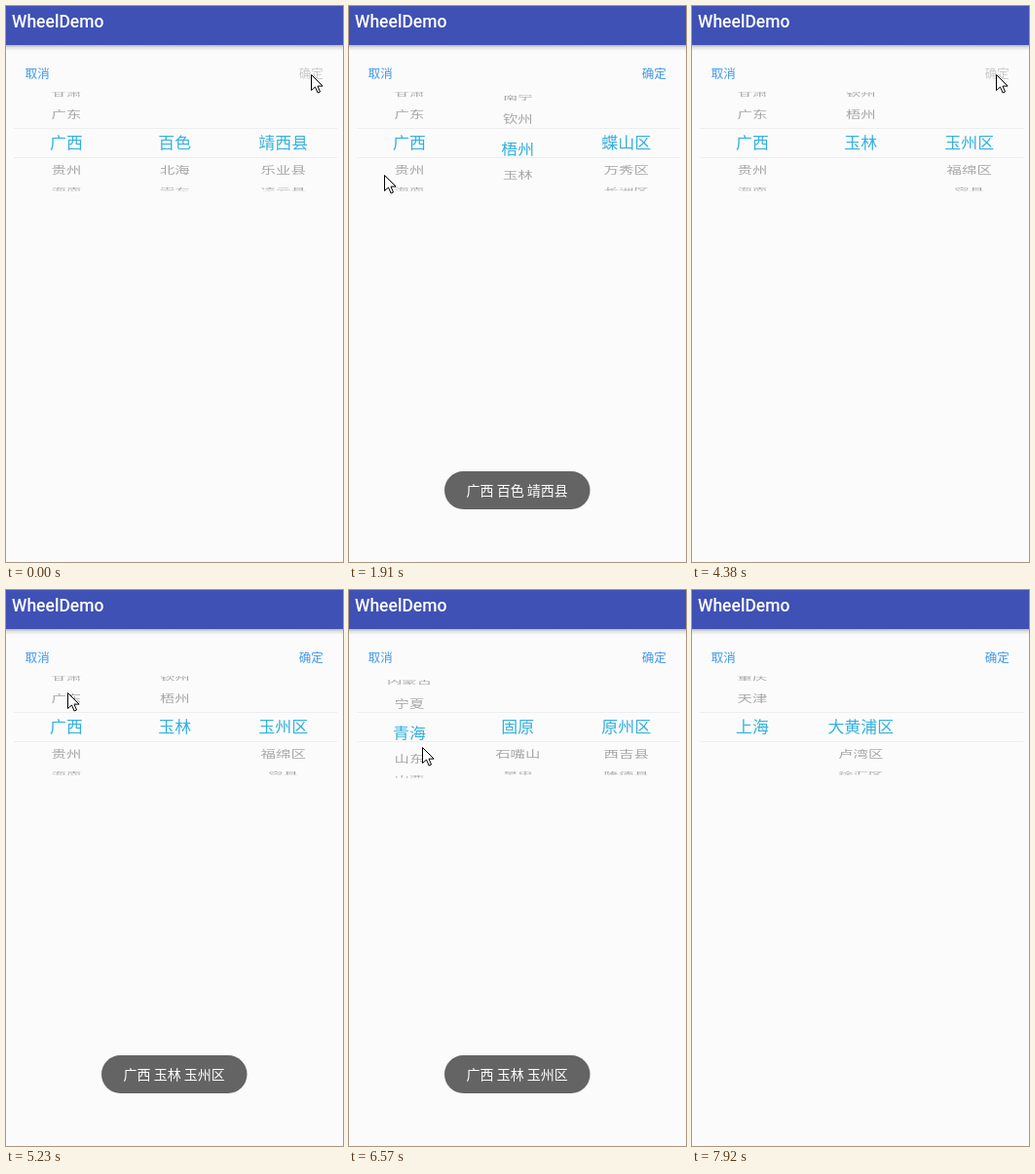
Write an HTML page with a canvas that moves like this. It is 346 px wide and 570 px high and loops after 8 s.

```html
<!DOCTYPE html>
<html lang="zh">
<head>
<meta charset="utf-8">
<style>
html, body { margin: 0; width: 100%; height: 100%; overflow: hidden; background: #fbfbfb; }
canvas { display: block; width: 346px; height: 570px; }
</style>
</head>
<body>
<canvas id="stage"></canvas>
<script>
const W = 346, H = 570, LOOP = 8000;
const CJK = '"Noto Sans CJK SC", "Noto Sans CJK", "Noto Sans CJK JP", sans-serif';
const canvas = document.getElementById('stage');
const ratio = window.devicePixelRatio || 1;
canvas.width = W * ratio;
canvas.height = H * ratio;
const ctx = canvas.getContext('2d');

const words = s => s.split(' ');
const provinces = words('安徽 福建 甘肃 广东 广西 贵州 海南 河北 河南 黑龙江 湖北 湖南 江苏 江西 吉林 辽宁 内蒙古 宁夏 青海 山东 山西 陕西 四川 西藏 新疆 云南 浙江 北京 重庆 天津 上海');
const guangxi = words('百色 北海 崇左 防城港 贵港 桂林 河池 贺州 来宾 柳州 南宁 钦州 梧州 玉林');
const ningxia = words('固原 石嘴山 吴忠 银川 中卫');
const shanghai = words('大黄浦区 卢湾区 徐汇区 长宁区');

function cityList(t) {
  return t < 6300 ? guangxi : t < 7450 ? ningxia : shanghai;
}

function districtList(t) {
  if (t < 1700) return words('靖西县 乐业县 凌云县');
  if (t < 2650) return words('蝶山区 万秀区 长洲区');
  if (t < 6300) return words('玉州区 福绵区 容县');
  return t < 7450 ? words('原州区 西吉县 隆德县') : [];
}

// Screen refreshes: start, end, number of evenly spaced updates
const bursts = [
  [150, 810, 6], [1090, 2060, 8], [2210, 3150, 8], [3270, 3970, 6],
  [4380, 5380, 8], [5530, 6570, 9], [6690, 7620, 8], [7770, 7920, 2]
];

// Pointer keys: time, x, y
const pointer = [
  [282, 313, 70], [810, 167, 172], [1090, 167, 165], [1370, 174, 98],
  [1650, 170, 118], [1900, 36, 173], [1930, 36, 173], [2060, 150, 176],
  [2344, 171, 135], [2610, 184, 80], [2870, 215, 19], [2890, 215, 19],
  [3150, 290, 66], [3550, 262, 183], [3970, 313, 70], [4670, 312, 70],
  [4950, 180, 108], [5225, 63, 105], [5240, 63, 105], [5530, 66, 165],
  [5920, 70, 56], [6180, 71, 172], [6570, 75, 161], [7089, 72, 2],
  [7620, 71, 160], [7770, 154, 90]
];

const ramp = (t, from, to) => Math.min(1, Math.max(0, (t - from) / (to - from)));
const ease = p => p * p * (3 - 2 * p);
const glide = (t, from, to) => ease(ramp(t, from, to));

function provincePos(t) {
  return 4 + 13.78 * glide(t, 5530, 6550) + 12.22 * glide(t, 6690, 7400);
}

function cityPos(t) {
  if (t >= 6300) return 0;
  return 11.81 * glide(t, 1090, 1900) + .19 * ramp(t, 1930, 2060)
    + .81 * glide(t, 2210, 2745) + .19 * ramp(t, 2890, 3010);
}

function toastAlpha(t) {
  return t < 3500
    ? ramp(t, 282, 546) * (1 - ramp(t, 2210, 2612))
    : ramp(t, 4523, 4810) * (1 - ramp(t, 6690, 7089));
}

function refreshTime(t) {
  const burst = bursts.filter(b => b[0] <= t).pop();
  if (!burst) return 0;
  const [start, end, count] = burst, step = (end - start) / (count - 1);
  return start + step * Math.min(count - 1, Math.floor((t - start) / step + .12));
}

function pointerAt(t) {
  const next = pointer.findIndex(k => k[0] > t);
  const b = next < 0 ? pointer[pointer.length - 1] : pointer[next];
  const a = next > 0 ? pointer[next - 1] : b;
  const p = a === b ? 0 : ramp(t, a[0], b[0]);
  return [1, 2].map(i => Math.round(a[i] + (b[i] - a[i]) * p));
}

function clipped(x, y, w, h, paint) {
  ctx.save();
  ctx.beginPath();
  ctx.rect(x, y, w, h);
  ctx.clip();
  paint();
  ctx.restore();
}

// Text centred on (x, y)
function label(text, x, y, size, color, sx = 1, sy = 1) {
  ctx.save();
  ctx.translate(x, y);
  ctx.scale(sx, sy);
  ctx.font = `${size}px ${CJK}`;
  ctx.textAlign = 'center';
  ctx.fillStyle = color;
  ctx.fillText(text, 0, size * .38);
  ctx.restore();
}

function wheel(items, x, pos) {
  const radius = 180 / Math.PI, mid = 140, size = 15.4;
  items.forEach((text, i) => {
    const d = i - pos;
    if (Math.abs(d) > 2.3) return;
    const angle = d * 30 / radius, flat = Math.cos(angle);
    const y = mid + radius * Math.sin(angle), outerY = y - .5;
    const faded = () => label(text, x, outerY, size, '#a6a6a6', 1, flat * .8);
    const top = d < -1.5 ? outerY - 1.6 : 80;
    const bottom = d > 1.5 ? outerY + .4 : 200;
    if (top < 125) clipped(x - 55, top, 110, 125 - top, faded);
    if (bottom > 155) clipped(x - 55, 155, 110, bottom - 155, faded);
    clipped(x - 55, 125, 110, 30, () => label(text, x, y, size, '#31b0e0', 1.1, flat));
  });
}

function header() {
  const shade = ctx.createLinearGradient(0, 40, 0, 46);
  shade.addColorStop(0, 'rgba(0,0,0,.28)');
  shade.addColorStop(.4, 'rgba(0,0,0,.1)');
  shade.addColorStop(1, 'rgba(0,0,0,0)');
  ctx.fillStyle = shade;
  ctx.fillRect(0, 40, W, 6);
  ctx.fillStyle = '#3f51b5';
  ctx.fillRect(0, 0, W, 40);
  ctx.font = '500 17.5px Roboto, sans-serif';
  ctx.textAlign = 'left';
  ctx.fillStyle = '#fff';
  ctx.fillText('WheelDemo', 6, 22);
}

function toast(text, alpha) {
  ctx.save();
  ctx.globalAlpha = alpha;
  ctx.fillStyle = '#646464';
  ctx.beginPath();
  ctx.arc(117.5, 496.5, 19.5, Math.PI / 2, Math.PI * 1.5);
  ctx.arc(228, 496.5, 19.5, -Math.PI / 2, Math.PI / 2);
  ctx.fill();
  label(text, 172.7, 496.5, 14, '#fff');
  ctx.restore();
}

function arrow(x, y) {
  const shape = new Path2D('M0 0V16L4 12.5L6.6 18.5L9 17.5L6.5 11.6H11.6Z');
  ctx.save();
  ctx.translate(x + .5, y + .5);
  ctx.fillStyle = '#fff';
  ctx.fill(shape);
  ctx.lineWidth = 1;
  ctx.strokeStyle = '#000';
  ctx.stroke(shape);
  ctx.restore();
}

function draw(t) {
  ctx.setTransform(ratio, 0, 0, ratio, 0, 0);
  ctx.fillStyle = '#fbfbfb';
  ctx.fillRect(0, 0, W, H);
  header();

  const pressed = t < 200 || (t >= 4380 && t < 4500);
  label('取消', 32.3, 69.5, 12.5, '#4299ec');
  label('确定', 313.3, 69.5, 12.5, pressed ? '#c9c9c9' : '#4299ec');

  ctx.fillStyle = '#eeeeee';
  ctx.fillRect(8, 125, 332, 1);
  ctx.fillRect(8, 155, 332, 1);
  wheel(provinces, 62, provincePos(t));
  wheel(cityList(t), 173.3, cityPos(t));
  wheel(districtList(t), 284.7, 0);

  const alpha = toastAlpha(t);
  if (alpha > 0) toast(t < 3500 ? '广西 百色 靖西县' : '广西 玉林 玉州区', alpha);
  if (t < 7900) arrow(...pointerAt(t));
}

let began;
function tick(now) {
  began ??= now;
  draw(refreshTime((now - began) % LOOP));
  requestAnimationFrame(tick);
}
draw(0);
requestAnimationFrame(tick);
</script>
</body>
</html>
```
